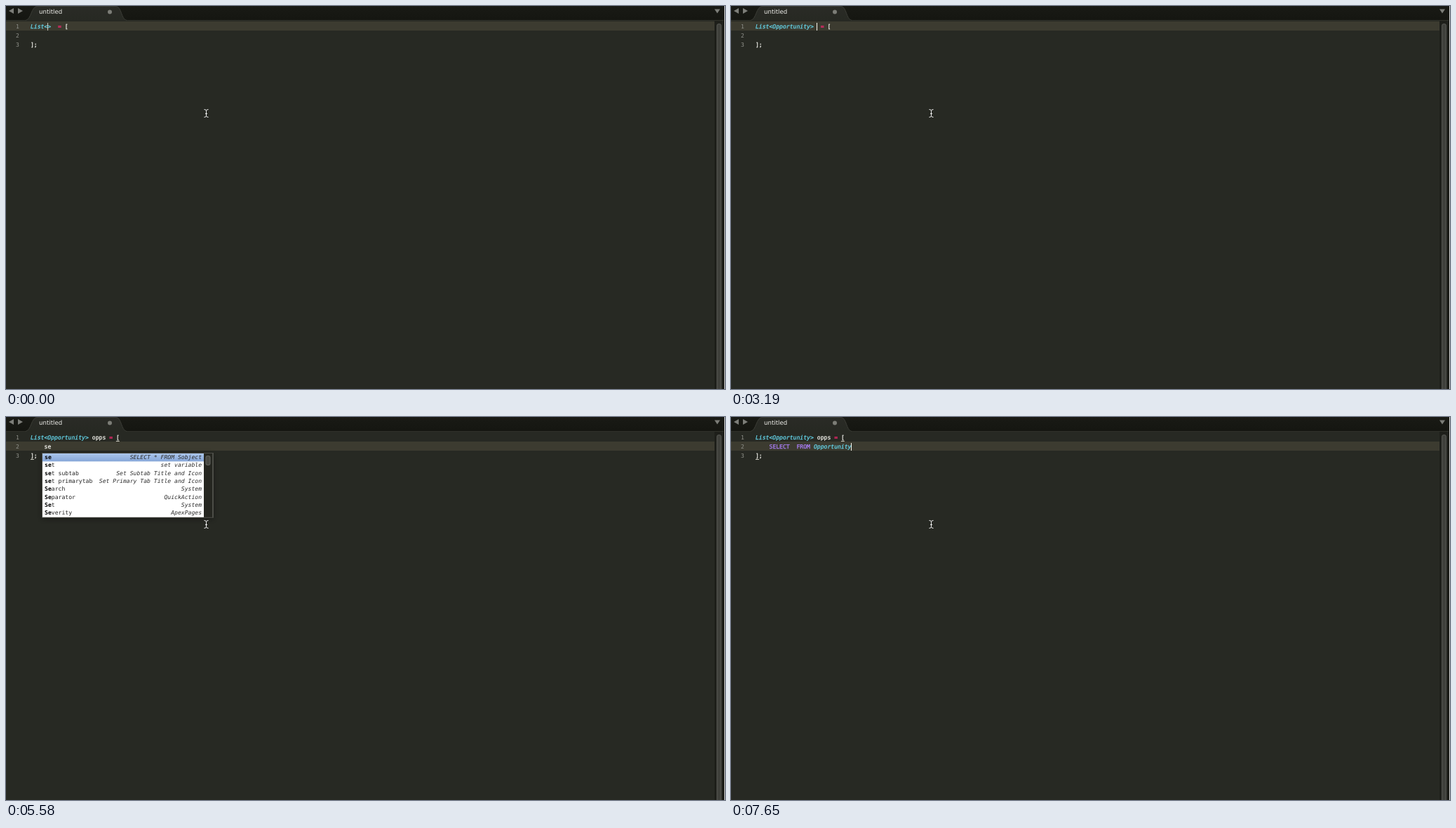
An HTML page with a canvas that plays this animation: 1025 px wide and 546 px high, repeating every 8 s.

```html
<!DOCTYPE html>
<html lang="en">
<head>
<meta charset="utf-8">
<title>Code completion</title>
<style>
  html, body { margin: 0; width: 100%; height: 100%; overflow: hidden; background: #272822; }
  canvas { display: block; }
</style>
</head>
<body>
<canvas id="stage" width="1025" height="546"></canvas>
<script>
const ctx = document.getElementById('stage').getContext('2d');
ctx.textRendering = 'geometricPrecision';

const LOOP = 8000;
const LEFT = 35, TOP = 22, LINE = 13, CHAR = 4.876, ROW = 11.35;
const MONO = '8.1px "DejaVu Sans Mono", monospace';
const BACKGROUND = '#272923';
const CYAN = '#66d9ef', PINK = '#f92672', PURPLE = '#ae81ff', WHITE = '#f8f8f2';

const sobjects = (...endings) => endings.map(ending => ['Opportunity' + ending, 'Sobject']);
const base = sobjects('', 'Competitor', 'Feed', 'History', 'Share', 'Stage');
const controller = ['OpportunityController', 'ApexClass'];
const organization = ['Organization', 'ConnectApi'];
const subtab = ['opensubtab', 'Open subtab in custom button'];
const full = [...base, controller, ...sobjects('ContactRole')];
const selectRows = [
  ['se', 'SELECT * FROM Sobject'], ['set', 'set variable'],
  ['set subtab', 'Set Subtab Title and Icon'],
  ['set primarytab', 'Set Primary Tab Title and Icon'],
  ['Search', 'System'], ['Separator', 'QuickAction'],
  ['Set', 'System'], ['Severity', 'ApexPages']
];

// Each completion list has its rows and the height of its scroll thumb.
const lists = {
  O: [[base[0], organization, ...base.slice(1), ['ObjectAnalysis', 'predictive']], 14],
  Op: [full, 28],
  Opp: [full, 55],
  Oppo: [full, 59],
  Oppor: [full, 59],
  Opport: [full, 59],
  o: [[subtab, base[0], organization, ...base.slice(1)], 14],
  op: [[subtab, ...base, controller], 28],
  opp: [full, 55],
  opps: [[base[4], base[5], base[3]], 0],
  s: [selectRows, 14],
  se: [selectRows, 14]
};

const start = { type: '', name: '', body: '', query: false, field: 'type', caret: 0.7, popup: false };
const typed = (field, text) => ({ [field]: text, field, caret: 1, popup: true });
const steps = [
  [150, { caret: 0 }],
  [660, { caret: 1 }],
  [960, { caret: 0.5 }],
  [1110, { caret: 0 }],
  [1560, typed('type', 'O')],
  [1860, typed('type', 'Op')],
  [2010, typed('type', 'Opp')],
  [2160, typed('type', 'Oppor')],
  [2600, { caret: 0 }],
  [2890, { type: 'Opportunity', caret: 1, popup: false }],
  [3190, { field: 'name' }],
  [3490, typed('name', 'o')],
  [3630, typed('name', 'op')],
  [3780, typed('name', 'opp')],
  [3930, typed('name', 'opps')],
  [4080, { popup: false }],
  [4380, { field: 'body' }],
  [4680, { caret: 0.5 }],
  [4830, { caret: 0 }],
  [4980, typed('body', 's')],
  [5130, typed('body', 'se')],
  [5430, { caret: 0.5 }],
  [5580, { caret: 0 }],
  [5880, { body: '', query: true, caret: 1, popup: false }],
  [6170, { caret: 0.5 }],
  [6320, { caret: 0 }],
  [6770, typed('body', 'O')],
  [6920, typed('body', 'Op')],
  [7060, typed('body', 'Opp')],
  [7210, typed('body', 'Oppo')],
  [7360, typed('body', 'Oppor')],
  [7500, typed('body', 'Opport')],
  [7650, { body: 'Opportunity', popup: false }]
];

function rect(x, y, w, h, fill) {
  ctx.fillStyle = fill;
  ctx.fillRect(x, y, w, h);
}

function roundRect(x, y, w, h, r, fill) {
  ctx.fillStyle = fill;
  ctx.beginPath();
  ctx.roundRect(x, y, w, h, r);
  ctx.fill();
}

function polygon(points, fill) {
  ctx.fillStyle = fill;
  ctx.beginPath();
  points.forEach(([x, y]) => ctx.lineTo(x, y));
  ctx.fill();
}

function gradient(y0, y1, from, to) {
  const g = ctx.createLinearGradient(0, y0, 0, y1);
  g.addColorStop(0, from);
  g.addColorStop(1, to);
  return g;
}

function text(str, x, y, color, style = '', align = 'left') {
  ctx.font = style + ' ' + MONO;
  ctx.textAlign = align;
  ctx.fillStyle = color;
  ctx.fillText(str, x, y);
}

const columnX = col => LEFT + col * CHAR;
const baseline = line => TOP + line * LINE + 10;

// Code is drawn slightly heavier than the popup text.
function code(str, line, col, color, style) {
  const x = columnX(col), y = baseline(line);
  text(str, x, y, color, style);
  ctx.strokeStyle = color;
  ctx.lineWidth = 0.25;
  ctx.strokeText(str, x, y);
}

function drawTab() {
  ctx.beginPath();
  ctx.moveTo(28, 20.5);
  ctx.bezierCurveTo(36, 19, 36, 1, 44, 0.5);
  ctx.lineTo(157, 0.5);
  ctx.bezierCurveTo(165, 1, 164, 19, 172, 20.5);
  ctx.fillStyle = gradient(0, 20, '#2a2b26', BACKGROUND);
  ctx.fill();
  ctx.strokeStyle = '#3b3c36';
  ctx.lineWidth = 1;
  ctx.stroke();
  rect(29, 20, 142, 2, BACKGROUND);

  ctx.font = '8.6px "DejaVu Sans", sans-serif';
  ctx.textAlign = 'left';
  ctx.fillStyle = '#f0f0ec';
  ctx.fillText('untitled', 47, 11);
  ctx.fillStyle = '#7c7d77';
  ctx.beginPath();
  ctx.arc(148, 8.5, 3, 0, 7);
  ctx.fill();
}

function drawChrome() {
  rect(0, 0, 1025, 546, BACKGROUND);
  rect(0, 0, 1025, 20, gradient(0, 20, '#191a15', '#151611'));
  rect(0, 20, 1025, 1, '#30312a');
  drawTab();
  const grey = '#7c7d78';
  polygon([[4, 7], [11, 3], [11, 11]], grey);
  polygon([[24, 7], [17, 3], [17, 11]], grey);
  polygon([[1010, 4.5], [1018, 4.5], [1014, 10.5]], grey);

  rect(1010, 21, 13, 525, '#1e1f1a');
  roundRect(1013, 25, 7, 540, 3.5, '#53544f');
  roundRect(1014, 26, 5, 540, 2.5, '#40413c');
  rect(1023, 0, 1, 546, '#161712');
  rect(1024, 0, 1, 546, '#d4d4d4');
}

function drawCode(s) {
  const activeLine = s.field === 'body' ? 1 : 0;
  rect(0, TOP + activeLine * LINE, 1010, LINE, '#3c3b30');
  for (let i = 0; i < 3; i++) text(i + 1, 18.8, baseline(i), '#8f908a', '', 'right');

  const nameCol = s.type.length + 7;
  const equalsCol = nameCol + s.name.length + 1;
  code(`List<${s.type}>`, 0, 0, CYAN, 'italic');
  code(s.name, 0, nameCol, WHITE);
  code('=', 0, equalsCol, PINK);
  code('[', 0, equalsCol + 2, WHITE);
  code('];', 2, 0, WHITE);

  const bodyCol = s.query ? 17 : 4;
  if (s.query) code('SELECT  FROM', 1, 4, PURPLE);
  code(s.body, 1, bodyCol, s.query ? CYAN : WHITE, s.query ? 'italic' : '');

  if (activeLine) {
    rect(columnX(equalsCol + 2), baseline(0) + 2, CHAR, 1, '#c9c9bd');
    rect(columnX(0), baseline(2) + 2, CHAR, 1, '#c9c9bd');
  }

  const wordCol = { type: 5, name: nameCol, body: bodyCol }[s.field];
  const caretX = Math.floor(columnX(wordCol + s[s.field].length));
  ctx.globalAlpha = s.caret;
  rect(caretX, TOP + activeLine * LINE + 2, 1, 11, '#f8f8f0');
  ctx.globalAlpha = 1;
  if (s.popup) drawPopup(s[s.field], columnX(wordCol), TOP + (activeLine + 1) * LINE + 4);
}

// Matched letters are bold, including those found further along the word.
function drawMatch(label, query, x, y) {
  let matched = 0;
  [...label].forEach((letter, i) => {
    const hit = matched < query.length && letter.toLowerCase() === query[matched].toLowerCase();
    if (hit) matched++;
    text(letter, x + i * CHAR, y, hit ? '#000' : '#222', hit ? 'bold' : '');
  });
}

function drawPopup(query, wordX, top) {
  const [rows, thumb] = lists[query];
  const left = Math.round(wordX - 2.7), width = 230, height = rows.length * ROW;
  ctx.shadowColor = 'rgba(0,0,0,.3)';
  ctx.shadowBlur = 8;
  ctx.shadowOffsetY = 2;
  rect(left - 1, top - 1, width + 15, height + 2, '#4c4d47');
  ctx.shadowColor = 'transparent';
  rect(left, top, width, height, '#fff');
  rect(left, top, width, ROW, gradient(top, top + ROW, '#abc6ec', '#86a6d8'));
  rect(left + width, top, 12, height, '#252620');
  if (thumb) {
    roundRect(left + width + 2.5, top + 3, 7, thumb, 3, '#62635e');
    roundRect(left + width + 3.5, top + 4, 5, thumb - 2, 2, '#484943');
  }
  rows.forEach(([label, kind], i) => {
    const y = Math.round(top + i * ROW + 8);
    drawMatch(label, query, left + 3, y);
    text(kind, left + width - 3, y, '#2c2c2c', 'italic', 'right');
  });
}

function drawPointer() {
  ctx.strokeStyle = '#f2f2f2';
  ctx.lineWidth = 1;
  ctx.beginPath();
  for (const [end, inner] of [[147.5, 149.5], [158.5, 156.5]]) {
    ctx.moveTo(282.5, end);
    ctx.quadraticCurveTo(285.5, end, 285.5, inner);
    ctx.quadraticCurveTo(285.5, end, 288.5, end);
  }
  ctx.moveTo(285.5, 149.5);
  ctx.lineTo(285.5, 156.5);
  ctx.moveTo(284, 153.5);
  ctx.lineTo(287, 153.5);
  ctx.stroke();
}

function frame() {
  const time = performance.now() % LOOP;
  const changes = steps.filter(([t]) => t <= time).map(([, change]) => change);
  drawChrome();
  drawCode(Object.assign({}, start, ...changes));
  drawPointer();
  requestAnimationFrame(frame);
}
frame();
</script>
</body>
</html>
```
